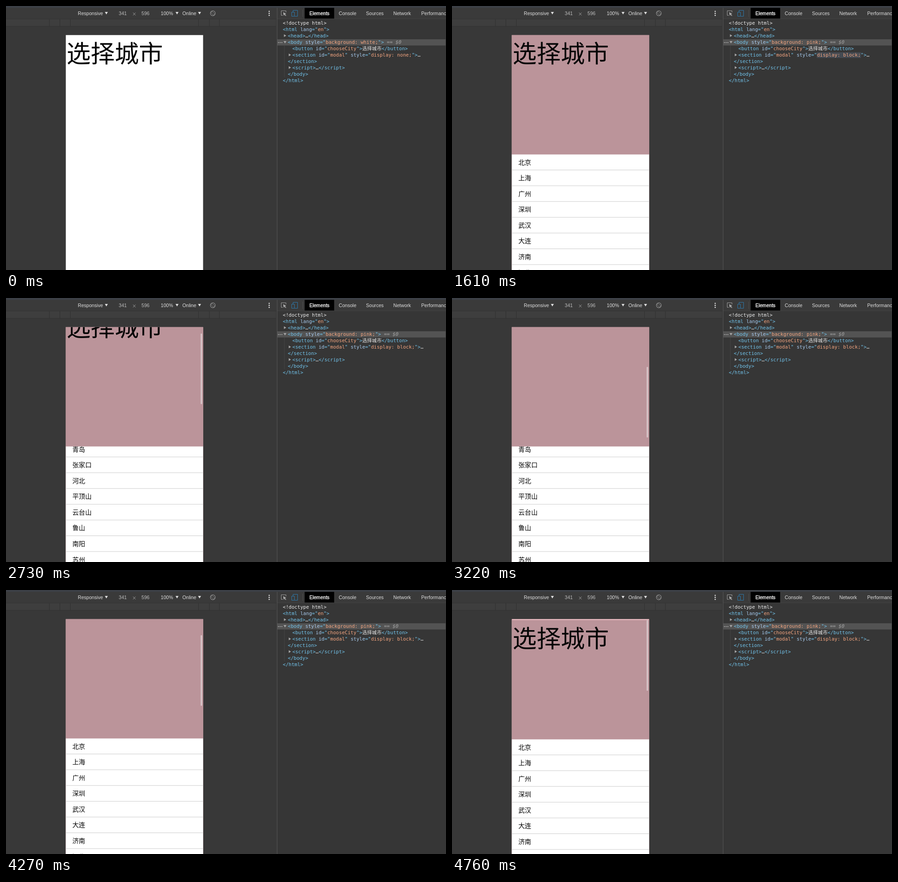
These frames come from a looping animation (968 px wide and 579 px high, 4830 ms). An HTML page:

```html
<!DOCTYPE html>
<html lang="zh">
<head>
<meta charset="utf-8">
<style>
html, body { margin: 0; width: 100%; height: 100%; overflow: hidden; background: #383838; }
svg { display: block; }
text { white-space: pre; }
.ui { font: 10.6px "Liberation Sans", Arial, sans-serif; fill: #dedede; }
.dim { fill: #bdbdbd; }
.code { font: 10.65px "DejaVu Sans Mono", "Noto Sans CJK SC", "Noto Sans CJK", monospace; fill: #72c4ec; }
.cjk { font-family: "Noto Sans CJK SC", "Noto Sans CJK", sans-serif; fill: #050505; }
.n { fill: #a9cbee; }
.v { fill: #f5a680; }
.w { fill: #ececec; }
.eq { fill: #a5a5a5; font-style: italic; }
.line { fill: none; stroke: #a0a0a0; }
</style>
</head>
<body>
<svg width="968" height="579" viewBox="0 0 968 579">
  <defs>
    <clipPath id="screen"><rect x="131.6" y="63.7" width="302" height="516"/></clipPath>
    <clipPath id="sheet"><rect x="131" y="325.6" width="304" height="266"/></clipPath>
  </defs>

  <!-- device toolbar and ruler -->
  <rect width="968" height="579" fill="#383838"/>
  <rect y="4" width="596" height="24" fill="#3a3a3a"/>
  <rect y="28" width="596" height="1" fill="#333"/>
  <rect y="29" width="594" height="15" fill="#3e3e3e"/>
  <path d="M0 44.5H594M95.5 29V44M118.5 29V44M141.5 29V44M423.5 29V44M447.5 29V44M469.5 29V44" stroke="#313131"/>
  <g class="ui">
    <text x="158" y="19.5">Responsive</text>
    <text class="dim" x="248" y="19.5">341</text>
    <text class="dim" x="298" y="19.5">596</text>
    <text x="340.5" y="19.5">100%</text>
    <text x="388" y="19.5">Online</text>
    <path d="M217.5 13h6.6l-3.3 5.6zM373 13h6.6l-3.3 5.6zM422.5 13h6.6l-3.3 5.6z"/>
    <circle cx="579" cy="11.8" r="1.4"/><circle cx="579" cy="16.2" r="1.4"/><circle cx="579" cy="20.6" r="1.4"/>
  </g>
  <path class="line" d="M279.5 14.5l5.5 6M285 14.5l-5.5 6"/>
  <g class="line" transform="rotate(-45 455 16)">
    <circle cx="455" cy="16" r="5.4"/><rect x="453" y="12" width="4" height="8" stroke-width=".8"/>
  </g>

  <!-- inspector panel -->
  <rect x="597" y="4" width="371" height="575" fill="#363636"/>
  <rect x="597" y="4" width="371" height="24" fill="#3a3a3a"/>
  <rect x="597" y="27.5" width="371" height="1" fill="#444"/>
  <rect x="596" y="4" width="1" height="575" fill="#555"/>
  <rect x="652" y="8" width="1" height="16" fill="#4b4b4b"/>
  <rect x="657" y="4" width="65" height="23.5" fill="#000"/>
  <path class="line" d="M609 20.5H605.5V10.5H616V14"/>
  <path d="M609.5 13.5l7 3.4-2.7 1 2.8 3-1.3 1.1-2.7-3-1.5 2.5z" fill="#a8a8a8"/>
  <path d="M631.5 13V9.5H641.5V22.5H635M628.5 13.5H634.5V22.5H628.5Z" fill="none" stroke="#2d78ab"/>
  <g class="ui">
    <text x="667.5" y="19.5" fill="#fff" stroke="#fff" stroke-width=".35">Elements</text>
    <text x="732" y="19.5">Console</text>
    <text x="792" y="19.5">Sources</text>
    <text x="852" y="19.5">Network</text>
    <text x="913.5" y="19.5">Performance</text>
  </g>
  <rect x="597" y="73" width="370" height="13.6" fill="#535353"/>
  <path d="M612.5 87V156" stroke="#434343"/>
  <rect id="bodyFlash" x="702" y="73.5" width="109.5" height="12.5"/>
  <rect id="modalFlash" x="802.5" y="101.5" width="97" height="12.5"/>
  <path d="M611.5 62l5 3-5 3zM610.5 77h6.5l-3.2 5zM622 104.3l5 3-5 3zM622 132l5 3-5 3z" fill="#a5a5a5"/>
  <path d="M598.5 80.2h2M602.2 80.2h2M605.9 80.2h2" stroke="#bbb" stroke-width="1.6"/>
  <g id="code" class="code"></g>

  <!-- emulated page -->
  <g clip-path="url(#screen)">
    <rect id="page" x="131" y="63" width="304" height="516"/>
    <g id="bounce">
      <rect id="shade" x="131" y="63.7" width="304" height="540" fill="#bb949a"/>
      <text id="title" class="cjk" x="133.2" y="123.6" font-size="53">选择城市</text>
      <g id="modal">
        <rect x="131" y="325.6" width="304" height="266" fill="#fff"/>
        <g clip-path="url(#sheet)"><g id="list"></g></g>
        <rect id="listBar" x="428.3" width="3" height="124.5" rx="1.5" fill="#e2e2e2"/>
      </g>
    </g>
    <rect id="pageBar" x="428.3" width="3" height="155" rx="1.5" fill="#dac9cc"/>
  </g>
  <rect width="968" height="4" fill="#3c4046"/>
</svg>
<script>
const LOOP = 4830, STEP = 70, OPEN = 420, UPDATE = 560;
const ROW = 34.57, LIST_MAX = 287.6;
const $ = id => document.getElementById(id);
const span = (cls, s) => `<tspan class="${cls}">${s}</tspan>`;
const attr = (name, value) => ` ${span('n', name)}="${value}"`;

// x, row, markup
const lines = [
  [609, 0, span('w', '&lt;!doctype html&gt;')],
  [609, 1, `&lt;html${attr('lang', span('v', 'en'))}&gt;`],
  [620, 2, `&lt;head&gt;${span('w', '…')}&lt;/head&gt;`],
  [620, 3, `&lt;body${attr('style', '<tspan class="v" id="bodyStyle"></tspan>')}&gt;${span('eq', ' == $0')}`],
  [630, 4, `&lt;button${attr('id', span('v', 'chooseCity'))}&gt;${span('w', '选择城市')}&lt;/button&gt;`],
  [630, 5, `&lt;section${attr('id', span('v', 'modal'))}${attr('style', '<tspan class="v" id="modalStyle"></tspan>')}&gt;${span('w', '…')}`],
  [620, 6, '&lt;/section&gt;'],
  [630, 7, `&lt;script&gt;${span('w', '…')}&lt;/script&gt;`],
  [620, 8, '&lt;/body&gt;'],
  [609, 9, '&lt;/html&gt;']
];
$('code').innerHTML = lines.map(([x, row, s]) =>
  `<text x="${x}" y="${40.7 + row * 14.06}">${s}</text>`).join('');

const cities = '北京 上海 广州 深圳 武汉 大连 济南 河北 青岛 张家口 河北 平顶山 云台山 鲁山 南阳 苏州'.split(' ');
$('list').innerHTML = cities.map((city, i) => {
  const y = 325.6 + i * ROW;
  return `<text class="cjk" x="146" y="${y + 22}" font-size="14.1">${city}</text>` +
    `<rect x="131" y="${y + ROW - 1}" width="304" height="1" fill="#ccc"/>`;
}).join('');

// Interpolates [time, value] stops, linear between neighbours
function track(stops, t) {
  if (t <= stops[0][0]) return stops[0][1];
  for (let i = 1; i < stops.length; i++) {
    const [t0, a] = stops[i - 1], [t1, b] = stops[i];
    if (t <= t1) return a + (b - a) * (t - t0) / (t1 - t0);
  }
  return stops[stops.length - 1][1];
}

const listScroll = [[1610, 0], [1750, 70], [1890, 200], [2030, 270], [2100, LIST_MAX],
  [3360, LIST_MAX], [3430, 250], [3570, 90], [3710, 0]];
const pageScroll = [[2660, 0], [2800, 80], [2940, 190], [3080, 265], [3220, 290],
  [3920, 290], [4060, 225], [4270, 113], [4410, 25], [4480, 0]];
const bounceY = [[4450, 0], [4550, 16], [4620, 9], [4690, 4.5], [4760, 2]];
const listBarAlpha = [[420, 1], [840, 1], [1050, 0], [1610, 0], [1680, 1], [2380, 1],
  [2590, 0], [3290, 0], [3360, 1], [3850, 1], [4060, 0]];
const pageBarAlpha = [[2590, 0], [2660, 1], [3360, 1], [3570, 0], [3780, 0], [3850, 1]];

const shift = (id, y) => $(id).setAttribute('transform', `translate(0 ${y})`);
const show = (id, alpha) => $(id).setAttribute('opacity', alpha);

function flash(id, t, life) {
  const p = (t - UPDATE) / life;
  if (p < 0 || p >= 1) return show(id, 0);
  const k = Math.min(1, p / 0.6), mix = (a, b) => Math.round(a + (b - a) * (1 - (1 - k) ** 3));
  $(id).setAttribute('fill', `rgb(${mix(120, 68)},${mix(60, 74)},${mix(118, 82)})`);
  show(id, Math.min(1, (1 - p) / 0.2));
}

function draw(t) {
  const open = t >= OPEN, updated = t >= UPDATE;
  const ls = track(listScroll, t), ps = track(pageScroll, t);
  $('page').setAttribute('fill', open ? '#f9c5cd' : '#fff');
  show('shade', +open);
  show('modal', +open);
  shift('bounce', track(bounceY, t));
  shift('title', -ps);
  shift('list', -ls);
  $('listBar').setAttribute('y', 328.8 + ls / LIST_MAX * 135);
  $('pageBar').setAttribute('y', 66 + ps * 0.293);
  show('listBar', track(listBarAlpha, t));
  show('pageBar', track(pageBarAlpha, t));
  $('bodyStyle').textContent = `background: ${updated ? 'pink' : 'white'};`;
  $('modalStyle').textContent = `display: ${updated ? 'block' : 'none'};`;
  flash('bodyFlash', t, 900);
  flash('modalFlash', t, 1400);
}

const start = performance.now();
function frame() {
  const t = (performance.now() - start) % LOOP;
  draw(Math.floor(t / STEP) * STEP);
  requestAnimationFrame(frame);
}
frame();
</script>
</body>
</html>
```
